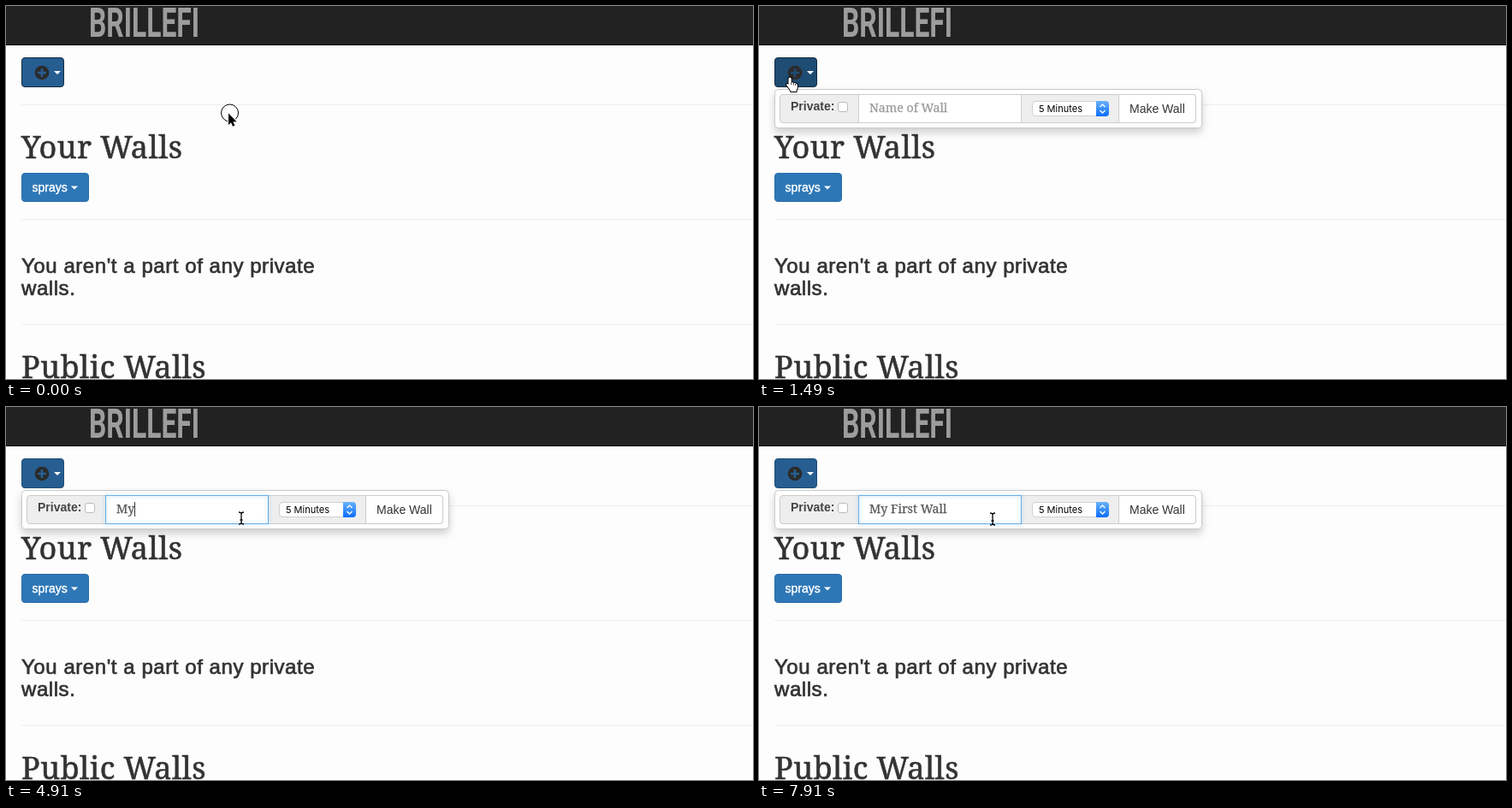
Recreate the animation shown at these times as an HTML page. Size 873 by 436 pixels, loop 8000 ms.

```html
<!DOCTYPE html>
<html lang="en">
<head>
<meta charset="utf-8">
<title>Create a wall</title>
<style>
  html, body { margin: 0; width: 100%; height: 100%; overflow: hidden; background: #fdfdfd; }
  svg { display: block; width: 873px; height: 436px; }
  text { font: 14px "Liberation Sans", Arial, sans-serif; fill: #333; white-space: pre; }
  .brand { font: 600 49px Roboto, sans-serif; fill: #9d9d9d; }
  .title { font: 36px "Noto Serif", serif; letter-spacing: .45px; stroke: #333; stroke-width: .6px; }
  .note { font-size: 24px; letter-spacing: .56px; stroke: #333; stroke-width: .7px; }
  .light { fill: #fff; stroke: #fff; stroke-width: .4px; }
  .bold { font-weight: 700; fill: #444; }
  .small { font: 11px Inter, sans-serif; fill: #000; }
  .field { font: 14.2px "Noto Serif", serif; fill: #555; stroke: #555; stroke-width: .25px; }
  .hint { fill: #999; stroke: #999; }
  .rule { stroke: #eee; }
  .box { stroke: #ccc; }
  #menu > rect:first-child { filter: drop-shadow(0 5px 5px rgba(0, 0, 0, .18)); }
  #ring { fill: none; stroke: #4a9ff0; stroke-width: 2px; filter: drop-shadow(0 0 1px #4a9ff0); }
  #glow { fill: none; stroke: #66afe9; filter: drop-shadow(0 0 2.5px rgba(102, 175, 233, .75)); }
  .mark { stroke-linejoin: round; paint-order: stroke; }
  .off { display: none; }
</style>
</head>
<body>
<svg viewBox="0 0 873 436">
  <defs>
    <linearGradient id="blue" x2="0" y2="1">
      <stop stop-color="#69b2fb"/><stop offset="1" stop-color="#0b6dfb"/>
    </linearGradient>
  </defs>

  <rect width="873" height="45" fill="#222"/>
  <rect y="45" width="873" height="1" fill="#080808"/>
  <text class="brand" transform="translate(97 36) scale(.65 1)">BRILLEFI</text>

  <path class="rule" d="M18 115.5H873M18 249.5H873M18 372.5H873"/>
  <text class="title" x="18" y="178">Your Walls</text>
  <text class="title" x="18" y="435">Public Walls</text>
  <text class="note" x="18" y="312">You aren't a part of any private</text>
  <text class="note" x="18" y="338">walls.</text>

  <rect x="18.5" y="195.5" width="78" height="33" rx="3.5" fill="#2e77b7" stroke="#2a6ca8"/>
  <text class="light" x="30.5" y="217">sprays</text>
  <path d="M76 210.5h8l-4 4z" fill="#fff"/>

  <rect id="add" x="18.5" y="60.5" width="49" height="34" rx="3.5"/>
  <rect id="ring" x="18" y="60" width="50" height="35" rx="3.5"/>
  <circle cx="42" cy="78" r="8.3" fill="#2b2b2b"/>
  <path id="plus" d="M37 78h10M42 73v10" stroke-width="2.6"/>
  <path d="M56 76h8l-4 4z" fill="#fff"/>

  <g id="menu">
    <rect x="18.5" y="97.5" width="499" height="45" rx="4" fill="#fff" stroke="#c9c9c9"/>
    <rect class="box" x="24.5" y="103.5" width="486" height="33" rx="3.5" fill="#eee"/>
    <path class="box" d="M116.5 103.5h190v33h-190z" fill="#fff"/>
    <path class="box" d="M420.5 103.5H507q3.5 0 3.5 3.5V133q0 3.5-3.5 3.5H420.5z" fill="#fff"/>
    <text class="bold" x="37" y="122">Private:</text>
    <rect x="92.5" y="112.5" width="11" height="11" rx="2.5" fill="#fff" stroke="#bbb"/>
    <rect x="319.5" y="111.5" width="89" height="17" rx="3.5" fill="#fff" stroke="#d0d0d0"/>
    <path d="M394 111h11q4 0 4 4v10q0 4-4 4h-11z" fill="url(#blue)"/>
    <path d="M398.5 118l3-3 3 3M398.5 122l3 3 3-3" fill="none" stroke="#fff" stroke-width="1.4"/>
    <text class="small" x="327" y="124">5 Minutes</text>
    <text x="433" y="125">Make Wall</text>
    <rect id="glow" x="116.5" y="103.5" width="190" height="33"/>
    <text id="hint" class="field hint" x="129" y="124">Name of Wall</text>
    <text id="typed" class="field" x="129" y="124"></text>
    <rect id="caret" y="111" width="1" height="17" fill="#333"/>
  </g>

  <g id="cursor">
    <g id="press" fill="none">
      <circle r="10" stroke="#fff" stroke-width="2.6" stroke-opacity=".8"/>
      <circle r="10" stroke="#000"/>
    </g>
    <path id="arrow" class="mark" d="M-1.5 .5v13.5l3-2.8 2 4.6 2.4-1-2-4.5h4.2z" stroke="#fff" stroke-width="2"/>
    <g id="hand" transform="translate(-1 2.5)">
      <path class="mark" fill="#fff" stroke="#000" stroke-width="2"
        d="M-2 1.2a1.6 1.6 0 0 1 3.2 0v4.3q2-.8 2.6.5q2-.6 2.6.8q2-.2 2 1.6v2.4q0 2-1.2 3.4v1.8h-6.4q-.5-2-2.8-4.6l-2.2-2.8q-.5-2 1.3-1.5l.9 1z"/>
      <path d="M1.2 5.5v2.5M3.8 6v2.5M6.2 7v2" stroke="#000" stroke-width=".8"/>
    </g>
    <path id="beam" d="M-3-7q3 0 3 2q0-2 3-2M0-5V5M-3 7q3 0 3-2q0 2 3 2M-1.5 2h3" fill="none" stroke="#000" stroke-width="1.3"/>
  </g>
</svg>

<script>
const LOOP = 8000;
const LABEL = "My First Wall";
const KEYS = [4610, 4910, 5060, 5360, 5510, 5660, 5960, 6110, 6260, 6710, 6860, 7160, 7310];
const BLINKS = [2370, 2970, 3420, 3870, 4470, 7760]; // caret toggles, on first

const $ = id => document.getElementById(id);
const show = (id, on) => $(id).classList.toggle("off", !on);
const within = (t, a, b) => t >= a && t < b;
const passed = (times, t) => times.filter(k => k <= t).length;
const ease = p => p * p * (3 - 2 * p);

// Movement advances in discrete screen updates.
function glide(t, start, gap, steps, from, to) {
  const n = Math.min(steps, Math.max(0, Math.floor((t - start) / gap + 1.001)));
  const p = ease(n / steps);
  return from.map((v, i) => v + (to[i] - v) * p);
}

function pointer(t) {
  if (t >= 7910) return [273, 131];
  if (t >= 2520) return [275, 130];
  if (t >= 1790) return glide(t, 1790, 145, 5, [37.5, 81.5], [276.5, 128.5]);
  return glide(t, 150, 148.33, 7, [261.5, 125], [37.5, 81.5]);
}

function draw(t) {
  const [x, y] = pointer(t);
  const open = t >= 1490;
  const overAdd = x < 68 && y < 95;
  const overField = open && x > 116;
  const pressed = within(t, 1040, 1790);

  $("cursor").setAttribute("transform", `translate(${x} ${y})`);
  show("hand", overAdd);
  show("beam", overField);
  show("arrow", !overAdd && !overField);
  show("press", t < 150 || within(t, 1340, 1490) || within(t, 2370, 2520));

  const fill = pressed || (open && overAdd) ? "#1f4c73" : "#265e92";
  $("add").setAttribute("fill", fill);
  $("add").setAttribute("stroke", t < 1790 ? "#122b40" : "#204d74");
  $("plus").setAttribute("stroke", fill);
  show("ring", within(t, 1340, 1490));

  const count = passed(KEYS, t);
  show("menu", open);
  show("glow", t >= 2520);
  show("hint", !count);
  $("typed").textContent = LABEL.slice(0, count);
  const width = count ? $("typed").getComputedTextLength() : 0;
  $("caret").setAttribute("x", Math.round(129 + width));
  show("caret", passed(BLINKS, t) % 2 === 1);
}

const begin = performance.now();
function tick() {
  draw((performance.now() - begin) % LOOP);
  requestAnimationFrame(tick);
}
tick();
</script>
</body>
</html>
```
